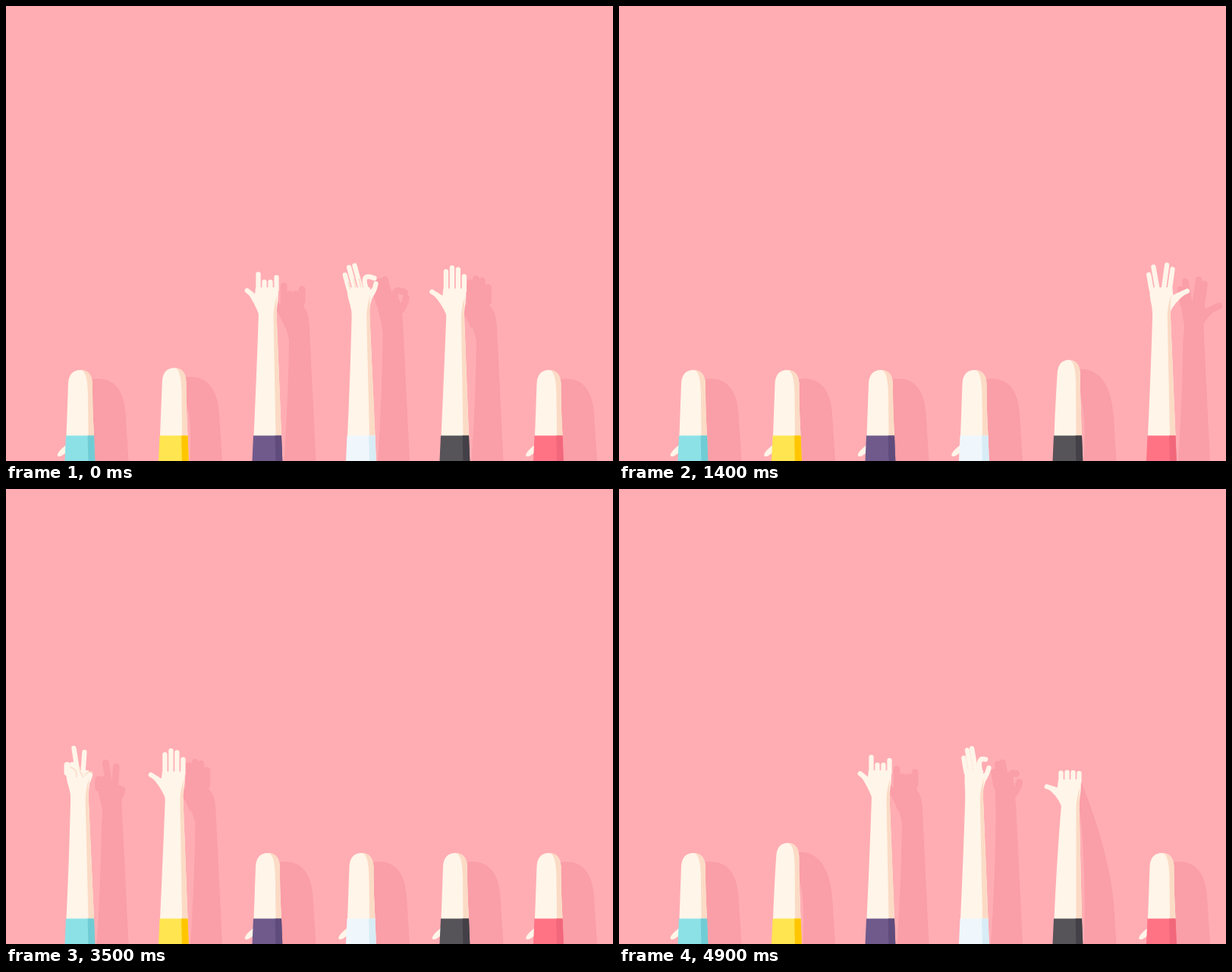
An HTML page for the animation above (4970 ms loop, 800 by 600 pixels).

```html
<!DOCTYPE html>
<html lang="en">
<head>
<meta charset="utf-8">
<title>Hand signs</title>
<style>
  html, body { margin: 0; width: 100%; height: 100%; overflow: hidden; background: #ffadb3; }
  svg { display: block; width: 100%; height: 100%; }
</style>
</head>
<body>
<svg id="stage" viewBox="0 0 800 600"></svg>
<script>
const SKIN = '#fff5e9', SHADE = '#fbdbc5', SHADOW = '#fa9ea7';
const STEP = 70, STEPS = 71, FIRST = 38, STAGGER = 7, SPACING = 123.5;
const MID = 97.5, REST = 480, CUFF = 566.4;

const clamp = (v, lo = 0, hi = 1) => Math.min(hi, Math.max(lo, v));
const mix = (a, b, k) => a + (b - a) * k;
const mixAll = (a, b, k) => a.map((v, i) => mix(v, b[i], k));
const blend = (a, b, k) => ({
  ...b,
  far: mix(a.far, b.far, k),
  digits: a.digits.map((d, i) => mixAll(d, b.digits[i], k))
});

// A digit is its tip, bend and base, grown from the base at an angle from upright.
function digit(x, y, degrees, length) {
  const a = degrees * Math.PI / 180;
  const dx = Math.sin(a) * length, dy = -Math.cos(a) * length;
  return [x + dx, y + dy, x + dx / 2, y + dy / 2, x, y];
}

// up: how far each finger is stretched, far: distance of the hand's shadow.
function pose({ up, lean = () => 0, gap = 8, slide = 0, thumb, far = 1, ...rest }) {
  const fingers = up.map((reach, i) => {
    const full = 33 - 4 * (i - 1.2) ** 2;
    return digit(MID + slide + (i - 1.5) * gap, 374, lean(i), mix(10, full, reach));
  });
  return { far, digits: [digit(84, 386, ...thumb), ...fingers], ...rest };
}

const OPEN = pose({ up: [1, 1, 1, 1], thumb: [-56, 20.5] });
const STUB = pose({ up: [.1, .1, .1, .1], thumb: [-72, 18] });
const PEACE = pose({
  up: [1, 1, 0, 0], lean: i => [-4, 9][i] ?? 0, gap: 7, slide: 2.5, thumb: [-20, 9],
  turned: true, fist: true, lines: 'M85 367Q94 369 93 380M97 366Q97 374 102 380M104 377Q109 371 114 374'
});
const SHAKA = pose({ up: [0, 0, 0, 1], lean: () => 24, slide: 1, thumb: [-32, 18], far: 1.08 });
const ROCK = pose({ up: [.6, 0, 0, .6], thumb: [-51, 17], far: 0.8 });
const RING = pose({
  up: [1, 1, 1, 1], lean: () => 15, thumb: [-30, 20], far: 0.95,
  turned: true, lines: 'M81 364L83 373M88 360L90 371M95 360L97 370'
});
RING.digits[0] = [74, 366, 76, 378, 84, 386];
RING.digits[1] = [76, 359, 95, 351, 86, 374];
const MIDDLE = pose({ up: [0, .95, 0, 0], thumb: [-44, 18.5], far: 0.86 });
const SPLIT = pose({ up: [1, 1, 1, 1], lean: i => i < 2 ? -8 : 10, thumb: [-65, 24], turned: true });

const ARMS = [
  ['#8ce1e7', '#70ccd4', PEACE],
  ['#ffe550', '#ffc600', SHAKA],
  ['#705a8c', '#604c7c', ROCK],
  ['#eff7fc', '#d8ecf5', RING],
  ['#565359', '#434047', MIDDLE],
  ['#ff7385', '#f2677b', SPLIT]
];

const fill = (d, color) => `<path d="${d}" fill="${color}"/>`;
const stroke = (d, color, w) =>
  `<path d="${d}" fill="none" stroke="${color}" stroke-width="${w}" stroke-linecap="round"/>`;
const move = (x, y, content) => `<g transform="translate(${x} ${y})">${content}</g>`;

function bentShadow(top, resting) {
  const k = (REST - top) / 66, left = resting ? 112 : 119;
  return fill(`M104 ${top + 22}Q107 ${top + 11} 114 ${top + 12}
    C${145 - 14 * k} ${488 - 50 * k} ${157 - 4 * k} ${510 - 24 * k} 158 545
    L161.5 600H${left}C${left + 2} 540 ${left} ${top + 60} 108 ${top + 30}Z`, SHADOW);
}

function bentArm(lift) {
  const top = REST - lift, k = lift / 66, resting = !lift;
  const cx = 98 + 4 * k, w = 16 - 4.5 * k, l = cx - w, r = cx + w;
  const crown = `C${cx + w * 0.6} ${top} ${r - 0.5} ${top + 6} ${r} ${top + 18}Q${r - 0.3} ${top + 45} 116 567`;
  const body = `M79.5 567Q${80.7 + 1.3 * k} ${535 - 45 * k} ${l} ${top + 18}
    C${l + 0.5} ${top + 6} ${cx - w * 0.6} ${top} ${cx} ${top}${crown}Z`;
  const side = `M${cx} ${top}${crown}H108.5L${cx + w * 0.62} ${top + 30}
    C${cx + w * 0.58} ${top + 12} ${cx + w * 0.45} ${top + 1} ${cx} ${top}Z`;
  const thumb = resting ? fill('M68 591Q69 587 79 579V589Q73 594 70 594Q67 594 68 591Z', SKIN) : '';
  return bentShadow(top, resting) + thumb + fill(body, SKIN) + fill(side, SHADE);
}

function hand(v, color, sideColor, grow = 0) {
  const point = s => (x, y) => `${(MID + (x - MID) * s + v.dx).toFixed(1)} ${(y + v.dy).toFixed(1)}`;
  const p = point(v.s), q = point(Math.sign(v.s) * Math.max(Math.abs(v.s), 0.75));
  const wrist = [86 + v.wrist, 109.5 + v.wrist];
  const [near, far] = v.s > 0 ? wrist : wrist.reverse();
  const low = 408 + v.dy;
  const palm = `M${q(82, 371)}L${q(111.5, 371)}C${q(113, 386)} ${far} ${low - 14} ${far} ${low}
    H${near}C${near} ${low - 14} ${q(80, 390)} ${q(81, 380)}Z`;
  const digits = v.digits.map(([tx, ty, cx, cy, bx, by], i) => stroke(
    `M${p(bx, by)}Q${p(cx, cy)} ${p(tx, ty)}`,
    i < 2 ? sideColor : color,
    (v.fist && ty > 360 ? 8 : 6.3) + grow
  ));
  const [tx, ty] = v.digits[0];
  const web = `M${p(tx, ty + 2)}Q${p(80, 391)} ${p(86, 406)}L${p(95, 385)}Z`;
  return fill(web, sideColor) + digits.join('') + fill(palm, color);
}

function raisedShadow(v) {
  const sx = 42 * v.far, sy = 19.5 * v.far;
  const arm = `M119.5 600Q125 520 126 440L${86 + sx} ${400 + sy}L${109 + sx} ${380 + sy}
    Q152 ${383 + sy} 153 425L161.5 600Z`;
  return fill(arm, SHADOW) + move(sx, sy, hand(v, SHADOW, SHADOW, 2.5));
}

function raisedArm(n, sign) {
  // Fingers fold right after the arm unbends and right before it bends again.
  const fold = 8 ** -Math.min(n - 4, 23 - n);
  const turn = clamp((n - 7) / 5), hold = clamp((n - 12) / 9);
  const drift = sign.turned ? -4 * turn ** 8 * (1 - hold) : 0;
  const v = {
    ...blend(blend(OPEN, sign, turn), STUB, fold),
    s: sign.turned ? Math.cos(Math.PI * turn) : 1,
    dx: drift + 3 * fold,
    dy: 12 * fold,
    wrist: drift * 0.2 + 3 * fold,
    fist: sign.fist && turn > 0.5
  };
  v.far *= clamp((n - 2) / 4);

  const w = v.wrist, y = 405 + v.dy;
  const body = `M79.5 567Q83.5 480 ${86 + w} ${y}H${109.5 + w}L116 567Z`;
  const side = `M${110.5 + w} ${y - 24}Q${109 + w} ${y - 10} ${109.5 + w} ${y}
    L116 567H108.5L${105.5 + w} ${y + 5}Q${105.5 + w} ${y - 8} ${110.5 + w} ${y - 24}Z`;
  const edgeOn = Math.abs(v.s) < 0.5;
  const lines = sign.lines && turn === 1 && fold < 0.1
    ? move(v.dx + 4, v.dy, stroke(sign.lines, SHADE, 1.3)) : '';
  return (fold < 1 ? raisedShadow(v) : bentShadow(370, false)) +
    fill(body, SKIN) + hand(v, SKIN, edgeOn ? SHADE : SKIN) + fill(side, SHADE) + lines;
}

function sleeve(light, dark) {
  return fill(`M79 ${CUFF}H116L117.3 600H77.5Z`, light) +
    fill(`M107.6 ${CUFF}H116L117.3 600H108.4Z`, dark);
}

function drawArm([light, dark, sign], i, step) {
  const n = (step - FIRST - STAGGER * i + 2 * STEPS) % STEPS;
  const near = Math.min(n, 27 - n);
  const arm = near > 3 ? raisedArm(n, sign) : bentArm(n < 27 ? 0.53 * 5 ** near : 0);
  return move(i * SPACING, 0, arm + sleeve(light, dark));
}

const stage = document.getElementById('stage');
let shown = -1;

function render(time) {
  const step = Math.floor(time / STEP) % STEPS;
  if (step === shown) return;
  shown = step;
  stage.innerHTML = '<rect width="800" height="600" fill="#ffadb3"/>' +
    ARMS.map((arm, i) => drawArm(arm, i, step)).join('');
}

function tick() {
  render(performance.now());
  requestAnimationFrame(tick);
}
tick();
</script>
</body>
</html>
```
